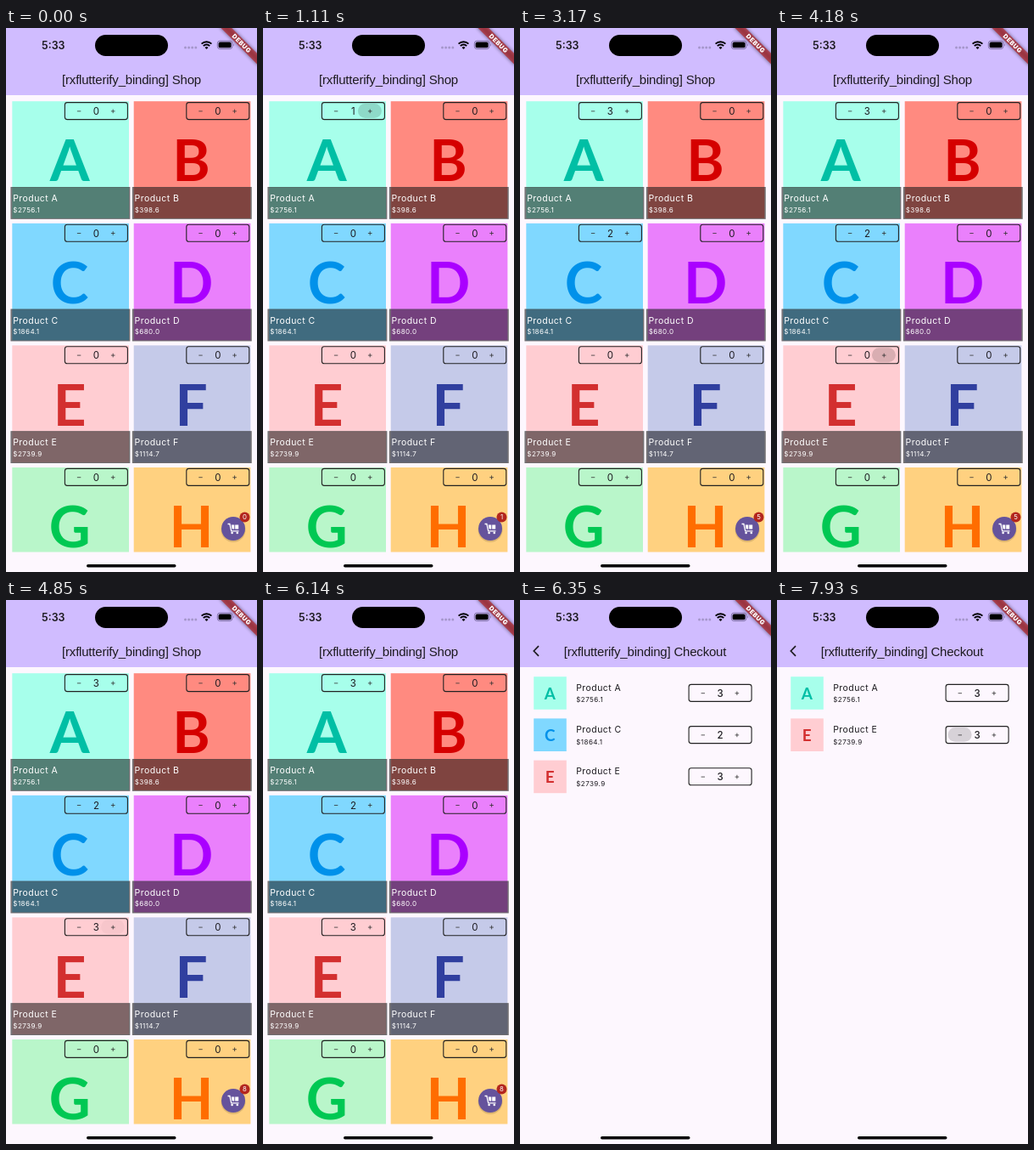
These frames come from a looping animation (296 by 640 pixels, 8000 ms). An HTML page:

```html
<!DOCTYPE html>
<html lang="en">
<head>
<meta charset="utf-8">
<title>Shop</title>
<style>
html, body { margin: 0; height: 100%; overflow: hidden; background: #fdf7fe; }
svg { display: block; width: 100vw; height: 100vh; }
text { font-family: Inter, Roboto, sans-serif; fill: #1d1b20; }
.title { font: 15px "Liberation Sans", Arial, sans-serif; letter-spacing: -.2px; }
.letter { font-family: Lato, sans-serif; font-weight: 700; }
.name { font-size: 10.5px; letter-spacing: .45px; }
.price { font-size: 8.1px; letter-spacing: .4px; }
.count { font-size: 11.5px; }
.light text { fill: #fff; }
.mid { text-anchor: middle; }
</style>
</head>
<body>
<svg viewBox="0 0 296 640">
  <defs>
    <clipPath id="list"><rect y="79" width="296" height="537.5"/></clipPath>
    <filter id="soft" x="-20%" y="-150%" width="140%" height="400%"><feGaussianBlur stdDeviation="2"/></filter>
  </defs>
  <g id="pages"></g>
  <g id="status">
    <text x="42" y="24.6" font-size="12.5" font-weight="600">5:33</text>
    <rect x="105" y="8" width="86" height="25" rx="12.5"/>
    <g fill="#a596cb"><circle cx="211.5" cy="23" r="1.5"/><circle cx="215.6" cy="23" r="1.5"/><circle cx="219.7" cy="23" r="1.5"/><circle cx="223.8" cy="23" r="1.5"/></g>
    <path d="M230.6 18.6a8.4 8.4 0 0 1 11.8 0M232.8 21.1a5.2 5.2 0 0 1 7.4 0" fill="none" stroke="#000" stroke-width="1.9"/>
    <path d="M234.5 22.9a2.9 2.9 0 0 1 4 0l-2 2.1z"/>
    <rect x="249.3" y="15.2" width="17.6" height="9.4" rx="3" fill="none" stroke="#75689a" stroke-width=".9"/>
    <rect x="250.6" y="16.5" width="15" height="6.8" rx="1.9"/>
    <path d="M268 18.4q1.5 1.5 0 3z" fill="#75689a"/>
    <g transform="translate(296 0) rotate(45)">
      <rect x="-32" y="21.1" width="64" height="9" fill-opacity=".5" filter="url(#soft)"/>
      <rect x="-32" y="21.1" width="64" height="9" fill="#b71c1c" fill-opacity=".63"/>
      <text class="mid" y="28.3" font-size="7.4" font-weight="900" letter-spacing=".5" style="fill:#fff">DEBUG</text>
    </g>
    <rect x="95" y="631" width="105.5" height="3.5" rx="1.75"/>
  </g>
</svg>
<script>
const LOOP = 8000;
// Bursts of screen updates: start, end, number of steps; the clock ticks in 10 ms
const bursts = [[0, 0, 1], [1000, 1790, 8], [1900, 1900, 1], [2590, 3170, 6],
  [4180, 4850, 7], [6030, 6350, 4], [7690, 7930, 3]];
const steps = bursts.flatMap(([a, b, n]) =>
  Array.from({ length: n }, (_, i) => 10 * Math.floor((a + (b - a) * i / Math.max(1, n - 1)) / 10)));

const product = (id, price, back, ink, taps = []) => ({ id, price, back, ink, taps });
const products = [
  product('A', '2756.1', '#a7ffeb', '#00bfa5', [1000, 1330, 1560]),
  product('B', '398.6', '#ff8a80', '#d50000'),
  product('C', '1864.1', '#80d8ff', '#0091ea', [2590, 2820]),
  product('D', '680.0', '#ea80fc', '#aa00ff'),
  product('E', '2739.9', '#ffcdd2', '#d32f2f', [4180, 4400, 4620]),
  product('F', '1114.7', '#c5cae9', '#303f9f'),
  product('G', '', '#b9f6ca', '#00c853'),
  product('H', '', '#ffd180', '#ff6d00')
];

const text = (x, y, cls, s, extra = '') => `<text x="${x}" y="${y}" class="${cls}" ${extra}>${s}</text>`;
const rect = (x, y, w, h, fill, extra = '') =>
  `<rect x="${x}" y="${y}" width="${w}" height="${h}" fill="${fill}" ${extra}/>`;
const move = (x, y, body) => `<g transform="translate(${x} ${y})">${body}</g>`;

// Tap highlight: holds, then fades out
const glow = age => .15 * Math.min(1, Math.max(0, (260 - age) / 150));
const countAt = (p, t) => p.taps.filter(s => t >= s + 100).length;

// Stepper; the highlight sits behind the minus or plus sign
function stepper(x, y, n, weight, minus, plus) {
  const pill = (px, a) => a ? rect(px, 2, 28, 17, '#000', `rx="8.5" fill-opacity="${a}"`) : '';
  return move(x, y, pill(3, minus) + pill(43, plus) +
    rect(.5, .5, 74, 20, 'none', 'rx="2.8" stroke="#222" stroke-width="1.1"') +
    '<path d="M15 10.8h4.4M55 10.8h4.6M57.3 8.5v4.6" stroke="#333" stroke-width=".8"/>' +
    text(37.5, 14.9, 'count mid', n, `font-weight="${weight}"`));
}

const tile = (p, size) => rect(0, 0, size, size, p.back) +
  text(size * .493, size * .684, 'letter mid', p.id, `font-size="${size * .49}" style="fill:${p.ink}"`);

const page = body => rect(0, 0, 296, 640, '#fdf7fe') + rect(0, 0, 296, 79, '#d0bcff') + body;

function card(p, i, t) {
  const lastTap = Math.max(-LOOP, ...p.taps.filter(s => s <= t));
  return move(7.3 + i % 2 * 143.4, 86.2 + (i >> 1) * 143.6,
    tile(p, 137.7) + stepper(61.6, .9, countAt(p, t), 400, 0, glow(t - lastTap)) +
    '<g class="light">' +
    rect(-1.8, 100.8, 140.8, 37.8, '#000', 'fill-opacity=".5"') +
    rect(-1.3, 101.3, 139.8, 36.8, 'none', 'stroke="#555" stroke-opacity=".35"') +
    text(.9, 118, 'name', 'Product ' + p.id) + text(1, 130.7, 'price', '$' + p.price) + '</g>');
}

const cart = total =>
  '<circle cx="268" cy="590.5" r="14.5" fill="#000" fill-opacity=".13"/>' +
  '<circle cx="268" cy="589" r="14" fill="#65539c"/>' +
  '<path d="M261.5 583.5h2.4l1.8 8.3h8.8" fill="none" stroke="#fff" stroke-width="1.3"/>' +
  '<path d="M265.7 584.6h3.6v5h-2.6zM270.2 584.6h4v5h-4z" fill="#fff"/>' +
  '<circle cx="266.6" cy="594" r="1.3" fill="#fff"/><circle cx="272.8" cy="594" r="1.3" fill="#fff"/>' +
  '<circle cx="281.5" cy="575.5" r="6" fill="#b3261e"/>' +
  text(281.5, 578.3, 'mid', total, 'font-size="7.8" style="fill:#fff"');

function shop(t) {
  const total = products.reduce((sum, p) => sum + countAt(p, t), 0);
  return page(text(148, 65.6, 'title mid', '[rxflutterify_binding] Shop')) +
    `<g clip-path="url(#list)">${products.map((p, i) => card(p, i, t)).join('')}</g>` + cart(total);
}

function checkout(t) {
  const left = p => countAt(p, t) - (p.id === 'C' && t >= 7810);
  const rows = products.filter(p => p.taps.length && !(p.id === 'C' && t >= 7930));
  return page(
    '<path d="M22 54.2l-5.7 5.8 5.7 5.8" fill="none" stroke="#1d1b20" stroke-width="1.7"/>' +
    text(147.5, 65.6, 'title mid', '[rxflutterify_binding] Checkout')) +
    rows.map((p, i) => move(16.2, 90.2 + i * 49.2,
      tile(p, 38.6) + text(50, 16.6, 'name', 'Product ' + p.id) + text(50, 30.3, 'price', '$' + p.price) +
      stepper(182.4, 8.7, left(p), 500, i === 1 && t >= 7690 ? .15 : 0, 0))).join('');
}

const pages = document.getElementById('pages');
const start = performance.now();
let shown = -1;
function frame() {
  const time = (performance.now() - start) % LOOP;
  const t = steps.findLast(s => s <= time);
  if (t !== shown) {
    shown = t;
    // The checkout slides in while the shop drifts left at a third of the speed
    const x = t < 6240 ? 296 : t < 6350 ? 7.4 : 0;
    pages.innerHTML = (x ? move((x - 296) / 3, 0, shop(t)) : '') + (x < 296 ? move(x, 0, checkout(t)) : '');
  }
  requestAnimationFrame(frame);
}
frame();
</script>
</body>
</html>
```
